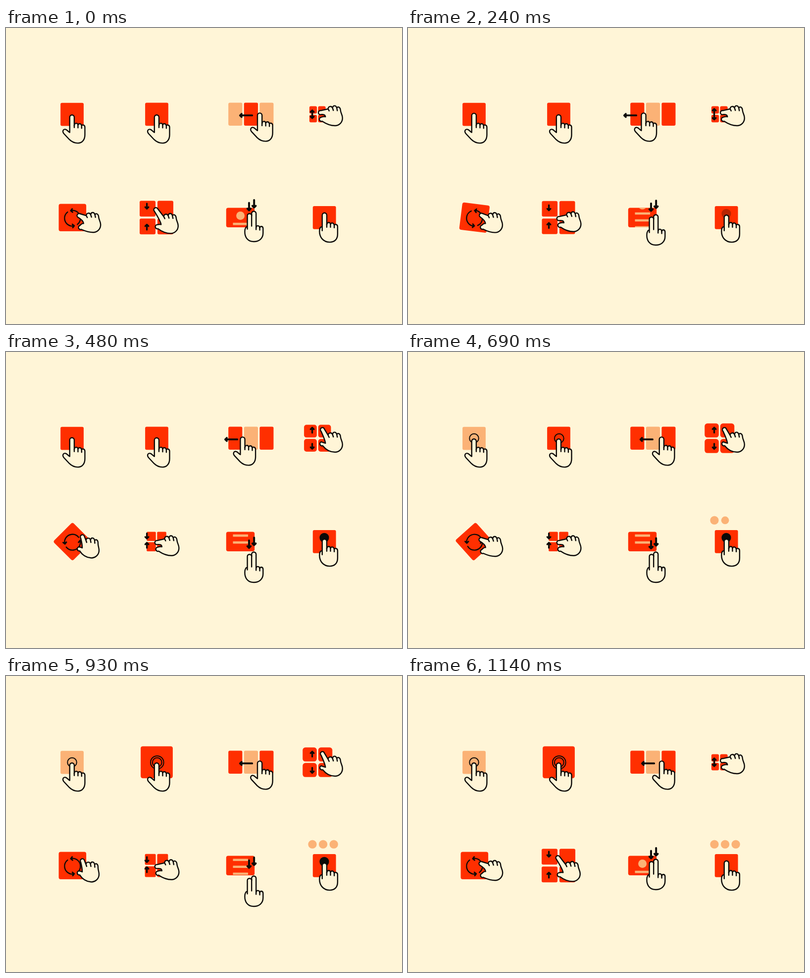
An HTML page with a canvas that plays this animation: 800 by 600 pixels, repeating every 1200 ms.

```html
<!DOCTYPE html>
<html lang="en">
<head>
<meta charset="utf-8">
<title>Gestures</title>
<style>
html, body { margin: 0; width: 100%; height: 100%; overflow: hidden; background: #fff5d7; }
canvas { display: block; }
</style>
</head>
<body>
<canvas id="stage" width="800" height="600"></canvas>
<script>
const ctx = document.getElementById('stage').getContext('2d');
const CREAM = '#fff5d7', RED = '#ff2f00', PEACH = '#fbb276', INK = '#0c0a08';
const LOOP = 1200, STEP = 30, OUTLINE = 2.4;

const mix = (a, b, k) => a + (b - a) * k;
const mixAll = (a, b, k) => a.map((v, i) => mix(v, b[i], k));
// Sine ease between two times, clamped to 0..1.
const ease = (t, from, to) => {
  const k = Math.min(1, Math.max(0, (t - from) / (to - from)));
  return (1 - Math.cos(Math.PI * k)) / 2;
};
const outBack = (t, a, b, c, d) => ease(t, a, b) - ease(t, c, d);

function box(x, y, w, h, r, color) {
  ctx.fillStyle = color;
  ctx.beginPath();
  ctx.roundRect(x, y, w, h, r);
  ctx.fill();
}

function square(cx, cy, half, color) {
  box(cx - half, cy - half, half * 2, half * 2, 3 * half / 23.4, color);
}

function disc(x, y, r, color) {
  ctx.fillStyle = color;
  ctx.beginPath();
  ctx.arc(x, y, r, 0, Math.PI * 2);
  ctx.fill();
}

function ring(x, y, r) {
  if (r <= 0) return;
  ctx.strokeStyle = INK;
  ctx.lineWidth = 2;
  ctx.beginPath();
  ctx.arc(x, y, r, 0, Math.PI * 2);
  ctx.stroke();
}

function arrow(x, y, angle, length, width, head) {
  ctx.save();
  ctx.translate(x, y);
  ctx.rotate(angle);
  ctx.strokeStyle = INK;
  ctx.lineWidth = width;
  ctx.beginPath();
  ctx.moveTo(-length, 0);
  ctx.lineTo(0, 0);
  ctx.moveTo(-head, -head);
  ctx.lineTo(0, 0);
  ctx.lineTo(-head, head);
  ctx.stroke();
  ctx.restore();
}

const UP = -Math.PI / 2, DOWN = Math.PI / 2, LEFT = Math.PI;

function paintHand(x, y, outline, creases) {
  ctx.save();
  ctx.translate(x, y);
  ctx.fillStyle = CREAM;
  ctx.strokeStyle = INK;
  ctx.lineWidth = OUTLINE;
  const shape = new Path2D(outline);
  ctx.fill(shape);
  ctx.stroke(shape);
  ctx.stroke(new Path2D(creases));
  ctx.restore();
}

function pointingHand(x, y, tip = 0) {
  paintHand(x, y, `M-4.5 35.5V${tip + 4.6}a4.6 4.6 0 0 1 9.2 0V22
    C5 15.5 12 15.5 12.2 20.5C13.5 16.5 19 17 19.6 22C21.5 19 26.2 20.5 26.2 25V40
    C26.2 50 21 57.2 12 57.2C4 57.2-1 54-5 50L-16.2 38C-20.4 33-17.4 28-12.6 29.5C-9.6 30.5-8 33.5-4.5 35.5Z`,
    'M4.7 21V25.5M12.2 20V26M19.6 21.5V27');
}

function pressingHand(x, y, tip) {
  paintHand(x, y, `M-4.5 36V${tip + 4.6}a4.6 4.6 0 0 1 9.2 0V25
    C5 18 12 18 12.2 23.5C13.5 19 19 20 19.8 25C21.8 22 26.6 23.5 26.6 28V43
    C26.6 53 21 59.4 11 59.4C-3 59.4-10 49-10 37C-10 31-8 28-4.5 28Z`,
    'M4.7 23V29M12.2 23V29M19.8 24.5V30');
}

function twoFingerHand(x, y) {
  paintHand(x, y, `M-13 36V9a4.3 4.3 0 0 1 8.6 0V4.5a4.5 4.5 0 0 1 9 0V33
    C5 28 11.5 28 12 34C13 29 18.7 30 18.7 35V44C18.7 55 11 61.5 0 61.5
    C-12 61.5-18.4 53-18.2 41C-18 35-16.5 31.5-13 31Z`,
    'M-4.4 7V30M4.6 30V37M12 33V38');
}

// Poses: index tip x, y, angle; thumb tip x, y, angle; palm rotation.
const PINCHED = [-20.5, -5.5, -2.95, -18.5, 8, -3.5, 0];
const SPREAD = [-21, -27, -2.2, -18, 7.5, -3.45, 0];
const SPREAD_SHORT = [-16.5, -24.5, -2.4, -17.5, 4, -3.5, 0];
const TURN_START = [-19.5, -13, -2.7, -16.5, 11, -3.5, 0];
const TURN_END = [-13, -19, -2.3, -16, 6, -3.5, 0.13];

function grabHand(x, y, [ix, iy, ia, tx, ty, ta, turn]) {
  ctx.save();
  ctx.translate(x, y);
  ctx.rotate(turn);
  ctx.fillStyle = CREAM;
  ctx.strokeStyle = INK;
  ctx.lineWidth = OUTLINE;
  const q = Math.PI / 2, r = 4.2;
  ctx.beginPath();
  ctx.moveTo(-10.5, 3);
  ctx.quadraticCurveTo(-11, -3, ix + r * Math.cos(ia - q), iy + r * Math.sin(ia - q));
  ctx.arc(ix, iy, r, ia - q, ia + q);
  ctx.lineTo(-5, -13);
  ctx.bezierCurveTo(-5, -18.5, 2, -20, 4, -14.5);
  ctx.bezierCurveTo(4.5, -21, 11, -21, 12.5, -14.5);
  ctx.bezierCurveTo(14, -19, 19.5, -17, 20, -10);
  ctx.bezierCurveTo(20.5, -4, 24, -1, 24, 5.5);
  ctx.bezierCurveTo(24, 14.5, 17, 21, 9, 21);
  ctx.bezierCurveTo(1, 21, -8, 18, tx + r * Math.cos(ta - q), ty + r * Math.sin(ta - q));
  ctx.arc(tx, ty, r, ta - q, ta + q);
  ctx.quadraticCurveTo(-13, 2, -10.5, 3);
  ctx.closePath();
  ctx.fill();
  ctx.moveTo(-5, -13);
  ctx.lineTo(-3, -9);
  ctx.moveTo(4, -14.5);
  ctx.lineTo(5.5, -10);
  ctx.moveTo(12.5, -14.5);
  ctx.lineTo(13.5, -9.5);
  ctx.stroke();
  ctx.restore();
}

function fourTiles(cx, cy, extent, gap, radius) {
  const size = extent - gap;
  for (const x of [cx - extent, cx + gap])
    for (const y of [cy - extent, cy + gap]) box(x, y, size, size, radius, RED);
}

function tap(t) {
  const tapped = t >= 570;
  square(133.5, 175.2, 23.4, tapped ? PEACH : RED);
  ring(133.5, 175, 9.3 * ease(t, 540, 640));
  pointingHand(133.2, 176.2, -3.3 * outBack(t, 60, 240, 430, 580));
}

function doubleTap(t) {
  square(304.5, 174.8, mix(23.4, 32.4, ease(t, 750, 870)), RED);
  ring(305.3, 175.2, 9.4 * ease(t, 540, 640));
  ring(305.3, 175.2, t < 750 ? 0 : mix(9.4, 13.3, ease(t, 750, 850)));
  const lift = outBack(t, 220, 360, 430, 580) + outBack(t, 690, 740, 740, 790);
  pointingHand(304.3, 176.2, -3 * lift);
}

function swipe(t) {
  const slide = ease(t, 20, 220);
  ctx.save();
  ctx.beginPath();
  ctx.roundRect(449, 151.2, 91.8, 46.8, 3);
  ctx.clip();
  for (let i = 0; i < 4; i++)
    box(449.2 + 31.6 * (i - slide), 151.2, 28.2, 46.8, 3, i % 2 ? RED : PEACH);
  ctx.restore();
  arrow(472.8 - 36 * (slide - ease(t, 375, 765)), 177.2, LEFT, 24.5, 3.7, 3.2);
  pointingHand(512.5 - 36.6 * (slide - ease(t, 440, 705)), 172.4);
}

function zoomIn(t) {
  const grow = outBack(t, 247, 580, 930, 1140);
  fourTiles(629.3, 174.8, mix(16.4, 30, grow), mix(1.2, 1.5, grow), mix(3, 5.5, grow));
  const reach = mix(8, 21.7, outBack(t, 126, 506, 930, 1140));
  arrow(618.6, 174.8 - reach, UP, 10.5, 3.3, 3.3);
  arrow(618.6, 174.8 + reach, DOWN, 10.5, 3.3, 3.3);
  const open = outBack(t, 240, 390, 930, 1140);
  grabHand(655.8, mix(177, 182, open), mixAll(PINCHED, SPREAD_SHORT, open));
}

function rotate(t) {
  const turn = (ease(t, 182, 404) + ease(t, 652, 874)) * Math.PI / 4;
  ctx.save();
  ctx.translate(134.3, 384.3);
  ctx.rotate(turn);
  box(-27.8, -27.8, 55.6, 55.6, 4, RED);
  ctx.restore();

  ctx.save();
  ctx.translate(134.3, 385.6);
  ctx.rotate(2 * turn);
  for (const head of [-1.8, -1.8 + Math.PI]) {
    ctx.strokeStyle = INK;
    ctx.lineWidth = OUTLINE;
    ctx.beginPath();
    ctx.arc(0, 0, 16, head + 0.1, head + 2.7);
    ctx.stroke();
    arrow(15.6 * Math.cos(head), 15.6 * Math.sin(head), head + UP + 0.1, 3, 2.8, 3.4);
  }
  ctx.restore();

  const reach = outBack(t, 200, 400, 480, 680) + outBack(t, 690, 890, 940, 1130);
  grabHand(mix(167.2, 164.8, reach), mix(393.3, 395.3, reach), mixAll(TURN_START, TURN_END, reach));
}

function zoomOut(t) {
  const shrink = outBack(t, 211, 456, 840, 1110);
  fourTiles(304, 384.2, mix(34, 19.8, shrink), mix(2, 1.3, shrink), mix(3, 1.8, shrink));
  const apart = mix(16, 4.2, outBack(t, 152, 400, 890, 1120));
  arrow(284.6, 382.4 - apart, DOWN, 10.5, 3.3, 3.3);
  arrow(284.6, 382.4 + apart, UP, 10.5, 3.3, 3.3);
  const pinch = outBack(t, 40, 230, 930, 1140);
  grabHand(mix(323.8, 325.4, pinch), mix(395.4, 391.8, pinch), mixAll(SPREAD, PINCHED, pinch));
}

function scroll(t) {
  box(444.8, 364.6, 57.4, 39.4, 4, RED);
  ctx.save();
  ctx.beginPath();
  ctx.rect(444.8, 364.6, 57.4, 39.4);
  ctx.clip();
  const y = -39 * outBack(t, 30, 430, 800, 1110);
  disc(473.6, 380.4 + y, 8.5, PEACH);
  for (let i = 0; i < 3; i++) box(458.5, 394.8 + 14 * i + y, 30.5, 4.6, 0.5, PEACH);
  ctx.restore();
  const drop = 28.6 * outBack(t, 200, 520, 810, 1120);
  arrow(491, 369.5 + drop, DOWN, 15, 3.9, 3.3);
  arrow(501.2, 363.8 + drop, DOWN, 15, 3.9, 3.3);
  twoFingerHand(500.6, 371.5 + 34 * outBack(t, 150, 450, 950, 1140));
}

function pop(t, start) {
  const k = Math.min(1, Math.max(0, (t - start) / 120));
  return k + 0.2 * Math.sin(Math.PI * k) * k;
}

function hold(t) {
  square(643.2, 384.4, 23.4, RED);
  ctx.globalAlpha = outBack(t, 150, 400, 960, 1130);
  disc(643, 376.4, 9.6, INK);
  ctx.globalAlpha = 1;
  [510, 590, 740].forEach((start, i) => {
    disc(619 + 21.6 * i, 341.2, 8.6 * pop(t, start), PEACH);
  });
  pressingHand(643.3, 374.7, 4.5 * outBack(t, 60, 230, 960, 1140));
}

const gestures = [tap, doubleTap, swipe, zoomIn, rotate, zoomOut, scroll, hold];

function draw(now) {
  const t = Math.min(LOOP - 2 * STEP, Math.floor(now % LOOP / STEP) * STEP);
  ctx.fillStyle = CREAM;
  ctx.fillRect(0, 0, 800, 600);
  ctx.lineCap = ctx.lineJoin = 'round';
  for (const gesture of gestures) gesture(t);
}

const begin = performance.now();
function tick() {
  draw(performance.now() - begin);
  requestAnimationFrame(tick);
}
tick();
</script>
</body>
</html>
```
